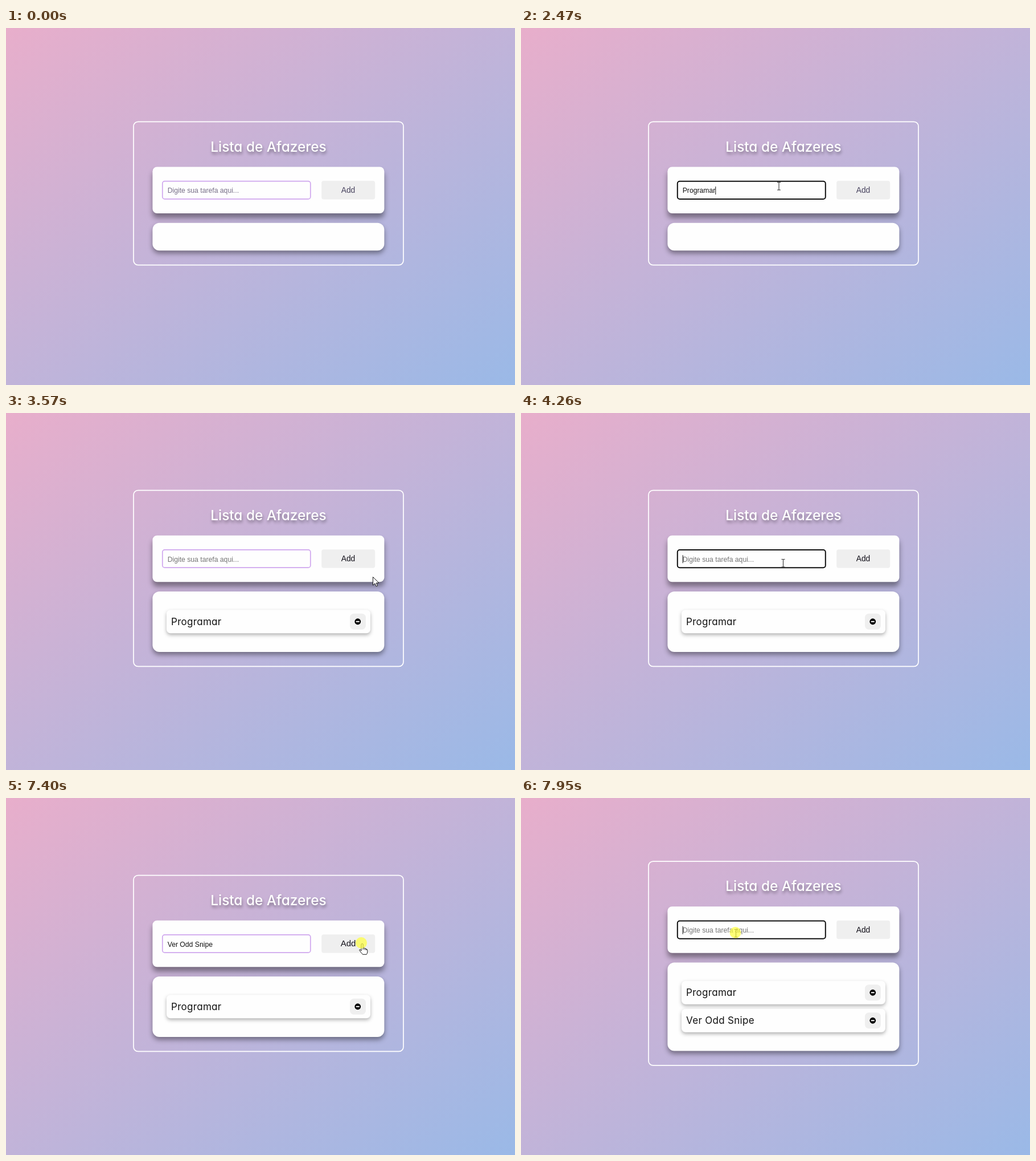
Animation, 894 px wide and 626 px high, one loop 8 s. Source, as an HTML page:

```html
<!DOCTYPE html>
<html lang="pt">
<head>
<meta charset="utf-8">
<title>Lista de Afazeres</title>
<style>
  html, body { margin: 0; width: 100%; height: 100%; overflow: hidden; }
  body { background: linear-gradient(to bottom right, #e8aecb, #9ab9e7); }
  #stage { display: block; width: 100%; height: 100%; }
  #frame { fill: none; stroke: #fff; stroke-width: 1.7; }
  #title, .item text { font-family: Inter, sans-serif; font-feature-settings: "cv11"; }
  #title { font-size: 24.4px; font-weight: 500; fill: #fff; text-anchor: middle; filter: drop-shadow(1px 4px 2.5px rgba(0,0,0,.35)); }
  .card { fill: #fefefe; }
  #form { filter: drop-shadow(0 8px 5px rgba(0,0,0,.4)); }
  #list { filter: drop-shadow(0 5px 4.5px rgba(0,0,0,.4)); }
  #field { fill: none; stroke: #cfa6ee; stroke-width: 1.7; }
  #field.focus { stroke: #101010; stroke-width: 2; }
  #hint, #typed, #add { font-family: "Liberation Sans", Arial, sans-serif; }
  #hint, #typed { font-size: 12.2px; white-space: pre; }
  #typed, #caret { fill: #111; }
  #add { text-anchor: middle; }
  .grey { fill: #efefef; }
  .item .card { filter: drop-shadow(0 3px 3px rgba(0,0,0,.3)); }
  .item text { font-size: 17px; letter-spacing: .3px; fill: #111; }
  #arrow, #hand { fill: #fff; stroke: #1a1a1a; }
  #beam { fill: none; stroke: #333; stroke-width: 1.1; }
  #glow { fill: rgba(255,255,60,.7); }
</style>
</head>
<body>
<svg id="stage">
  <g id="panel">
    <rect id="frame" x="224" y=".8" width="474" rx="8"/>
    <text id="title" x="461" y="53.2">Lista de Afazeres</text>
    <rect id="form" class="card" x="257.4" y="80" width="407" height="81.5" rx="8"/>
    <rect id="list" class="card" x="257.4" y="178.3" width="407" rx="12"/>
    <rect id="field" x="274.8" y="105.2" width="260" height="31.2" rx="4"/>
    <text id="hint" x="283.7" y="125.8">Digite sua tarefa aqui...</text>
    <text id="typed" x="283.7" y="125.8" xml:space="preserve"></text>
    <rect id="caret" y="114.5" width="1" height="14"/>
    <rect class="grey" x="554.2" y="104.5" width="94" height="32.5" rx="4"/>
    <text id="add" x="601" y="125.3">Add</text>
  </g>
  <g id="cursor">
    <path id="arrow" d="M.5 .5V15L4 11.8 6.3 17 8.6 16 6.3 11H11Z"/>
    <path id="beam" d="M-3-6.5H-1Q0-6.5 0-5.5 0-6.5 1-6.5H3M0-6V6.5M-3 7H-1Q0 7 0 6 0 7 1 7H3"/>
    <path id="hand" transform="translate(-5 0)" d="M4 13V2a1.6 1.6 0 0 1 3.2 0V8q2.6-1 3 1 2-.6 2.6 1 2 0 2 2.2V15q0 2.5-1.6 4.3H6.5Q4.5 17 1 12.5 .2 10.6 2 10.8ZM7.2 8V11M10.2 9V11.5M12.7 10V12"/>
    <circle id="glow" cx="-1" cy="-1" r="10"/>
  </g>
</svg>
<script>
const LOOP = 8000, CLICK = 70, BLINK = 500;
const $ = id => document.getElementById(id);

// each round: click the field, type in bursts [start, ms per key, text], press Add
const ROUNDS = [
  { focus: 970, press: 3500, bursts: [[1670, 100, "Programar"]] },
  { focus: 4090, press: 7400, bursts: [[4990, 130, "Ver "], [5600, 110, "Odd "], [6200, 115, "Snipe"]] },
  { focus: 7890, press: LOOP, bursts: [] }
];

// pointer legs: start, end, goal x, goal y
const ENTRY = [880, 460];
const LEGS = [
  [380, 900, 453, 277],
  [3020, 3450, 644, 287],
  [3570, 3920, 460.5, 263],
  [7060, 7390, 625, 255],
  [7470, 7820, 377.5, 237]
];

const ease = k => k * k * (3 - 2 * k);
const clamp = k => Math.min(1, Math.max(0, k));

function pointer(t) {
  let [x, y] = ENTRY;
  for (const [from, to, gx, gy] of LEGS) {
    const k = ease(clamp((t - from) / (to - from)));
    x += (gx - x) * k;
    y += (gy - y) * k;
  }
  return [x, y];
}

// text typed so far and the time of the last key
function typing(bursts, t) {
  let text = "", last = 0;
  for (const [from, step, part] of bursts) {
    if (t < from) break;
    const n = Math.min(part.length, Math.floor((t - from) / step) + 1);
    text += part.slice(0, n);
    last = from + (n - 1) * step;
  }
  return { text, last };
}

const items = ROUNDS.slice(0, 2).map((round, i) => {
  const el = document.createElementNS("http://www.w3.org/2000/svg", "g");
  el.setAttribute("class", "item");
  el.setAttribute("transform", `translate(282 ${210.5 + i * 49})`);
  el.innerHTML = `<rect class="card" width="358" height="41" rx="7"/>
    <text x="8" y="26.7">${round.bursts.map(b => b[2]).join("")}</text>
    <rect class="grey" x="322" y="6.5" width="28" height="28" rx="7"/>
    <circle cx="335.8" cy="20.5" r="5.4"/>
    <rect x="332.8" y="19.5" width="6" height="2" rx=".5" fill="#fff"/>`;
  $("panel").append(el);
  return el;
});

const show = (el, on) => { el.style.visibility = on ? "visible" : "hidden"; };
const size = (id, h) => $(id).setAttribute("height", h);

function draw(t) {
  const count = ROUNDS.filter(r => t >= r.press + CLICK).length;
  const grow = count ? 8.5 + count * 49 : 0;
  const top = 163.5 - grow / 2;
  $("panel").setAttribute("transform", `translate(0 ${top})`);
  size("frame", 251.4 + grow);
  size("list", 48.5 + grow);
  items.forEach((el, i) => show(el, i < count));

  const { focus, press, bursts } = ROUNDS[count];
  const { text, last } = typing(bursts, t);
  const focused = t >= focus && t < press;
  $("typed").textContent = text;
  show($("hint"), !text);
  $("hint").style.fill = count ? "#757575" : "#776f88";
  $("field").setAttribute("class", focused ? "focus" : "");
  $("caret").setAttribute("x", 283.7 + (text ? $("typed").getComputedTextLength() : 0));
  show($("caret"), focused && Math.floor((t - Math.max(focus, last)) / BLINK) % 2 === 0);

  const [x, y] = pointer(t);
  const inRow = y >= top + 104.5 && y <= top + 137;
  const overField = inRow && x >= 274 && x <= 535;
  const overAdd = inRow && x >= 554 && x <= 648;
  const entered = t >= LEGS[0][0];
  $("cursor").setAttribute("transform", `translate(${x} ${y})`);
  show($("arrow"), entered && !overField && !overAdd);
  show($("beam"), entered && overField);
  show($("hand"), entered && overAdd);
  show($("glow"), [focus, press].some(c => t >= c && t < c + CLICK));
  $("add").style.fontSize = overAdd ? "15px" : "13.8px";
  $("add").style.fill = count || overAdd ? "#15131c" : "#4a4560";
}

const start = performance.now();
function tick() {
  draw((performance.now() - start) % LOOP);
  requestAnimationFrame(tick);
}
draw(0);
requestAnimationFrame(tick);
</script>
</body>
</html>
```
